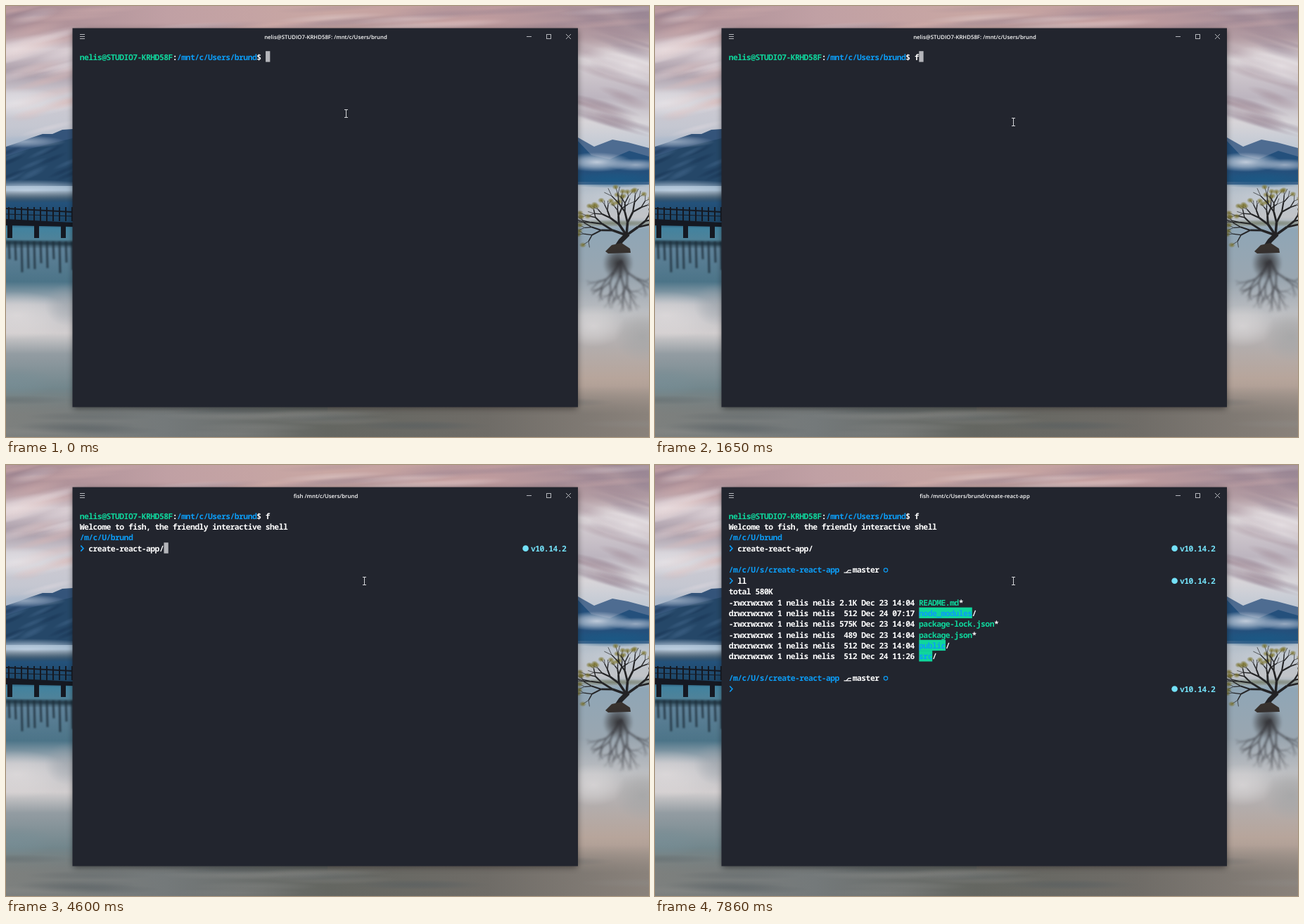
An HTML page with a canvas that plays this animation: 914 by 613 pixels, repeating every 8000 ms.

```html
<!DOCTYPE html>
<html lang="en">
<head>
<meta charset="utf-8">
<title>Terminal session</title>
<style>
  html, body { margin: 0; width: 100%; height: 100%; overflow: hidden; background: #8a8588; }
  canvas { display: block; }
</style>
</head>
<body>
<canvas id="stage" width="914" height="613"></canvas>
<script>
const W = 914, H = 613, LOOP = 8000;
const LEFT = 105, TOP = 64.2, CELL = 6.287, ROW = 15.375;
const WHITE = '#ffffff', GREEN = '#0fd69c', BLUE = '#0c9cf5', CYAN = '#74e1f8',
      RED = '#ff5c57', DIM = '#6d717d', PANEL = '#22252e';
const MONO = '11.4px "Noto Sans Mono", "DejaVu Sans Mono", monospace';
const USER = 'nelis', HOST = 'STUDIO7-KRHD58F', HOME = '/mnt/c/Users/brund';
const APP = 'create-react-app';

const ctx = document.getElementById('stage').getContext('2d');
const scene = document.createElement('canvas');
scene.width = W;
scene.height = H;
paintScene(scene.getContext('2d'));

// ---------- static desktop and window ----------

function paintScene(g) {
  let seed = 11;
  const rnd = () => (seed = seed * 16807 % 2147483647) / 2147483647;

  function column(x, w, stops) {
    const fill = g.createLinearGradient(0, 0, 0, H);
    for (const [y, color] of stops) fill.addColorStop(y / H, color);
    g.fillStyle = fill;
    g.fillRect(x, 0, w, H);
  }
  // Solid at the outer edge of the stage, fading out towards the other end.
  function fadeStrip(edge, solid, end, colors) {
    const fill = g.createLinearGradient(0, 0, W, 0);
    colors.forEach((c, i) => fill.addColorStop(i / (colors.length - 1), c));
    g.fillStyle = fill;
    for (let y = Math.min(edge, end); y < Math.max(edge, end); y++) {
      g.globalAlpha = Math.max(0, Math.min(1, (end - y) / (end - solid)));
      g.fillRect(0, y, W, 1);
    }
    g.globalAlpha = 1;
  }
  function glow(x, y, rx, ry, rgb, alpha, tilt = 0) {
    g.save();
    g.translate(x, y);
    g.rotate(tilt);
    g.scale(rx, ry);
    const fill = g.createRadialGradient(0, 0, 0, 0, 0, 1);
    fill.addColorStop(0, `rgba(${rgb},${alpha})`);
    fill.addColorStop(0.5, `rgba(${rgb},${alpha * 0.6})`);
    fill.addColorStop(1, `rgba(${rgb},0)`);
    g.fillStyle = fill;
    g.fillRect(-1, -1, 2, 2);
    g.restore();
  }
  function shape(color, ...points) {
    g.fillStyle = color;
    g.beginPath();
    for (const [x, y] of points) g.lineTo(x, y);
    g.fill();
  }
  function stroke(color, width, ...points) {
    g.strokeStyle = color;
    g.lineWidth = width;
    g.beginPath();
    for (const [x, y] of points) g.lineTo(x, y);
    g.stroke();
  }

  column(0, 457, [[0, '#a78d96'], [32, '#bda5ac'], [62, '#d3c7cd'], [95, '#a99ca8'],
    [125, '#cfcbd2'], [172, '#c5c7d1'], [250, '#8ea6bd'], [315, '#4f8097'], [345, '#5f8299'],
    [392, '#4c7488'], [425, '#b9bcc2'], [465, '#d2cecf'], [495, '#939ca2'],
    [545, '#71868c'], [H, '#7d7d79']]);
  column(457, 457, [[0, '#a18c97'], [45, '#b8a3a9'], [75, '#d8d1d5'], [130, '#bdb5bf'],
    [165, '#d8d5d9'], [215, '#b8c4d2'], [255, '#b3bfcb'], [300, '#c2c4c8'], [318, '#8fa6b6'],
    [390, '#9aa6b0'], [440, '#bfc0c3'], [485, '#b3adac'], [530, '#b7a59b'], [H, '#8a827c']]);
  fadeStrip(0, 24, 60, ['#a78b94', '#c0a0a4', '#c9a7a3', '#bd9a9d', '#a38f9a']);
  fadeStrip(H, 580, 540, ['#7d807e', '#74797a', '#646661', '#6f6c67', '#8a827b']);

  // streaky clouds above, calm ripples below
  const tones = ['232,222,226', '140,122,140', '222,184,180', '160,136,148'];
  for (let i = 0; i < 60; i++) {
    const side = i % 2 ? 813 : 0;
    glow(side + rnd() * 100, rnd() * 175, 30 + rnd() * 40, 4 + rnd() * 8,
      tones[i % 4], 0.35, side ? 0.3 : -0.25);
  }
  for (let i = 0; i < 24; i++) {
    glow(rnd() * W, 3 + rnd() * 28, 80, 6, tones[i % 4], 0.3, -0.06);
    glow(rnd() * W, 560 + rnd() * 50, 90, 7, i % 2 ? '142,142,140' : '84,92,96', 0.3);
  }
  glow(15, 62, 70, 18, '236,226,228', 0.7, -0.2);
  glow(15, 138, 75, 22, '230,228,232', 0.8);
  glow(890, 85, 70, 26, '238,234,236', 0.8, 0.2);
  glow(15, 440, 80, 34, '228,223,223', 0.7);
  glow(85, 425, 30, 30, '150,158,166', 0.5);
  glow(835, 455, 45, 30, '222,219,220', 0.7);
  glow(905, 470, 40, 36, '164,165,166', 0.8);
  glow(10, 535, 60, 22, '120,142,150', 0.7);

  // left mountains with mist
  shape('#34547a', [0, 200], [18, 194], [34, 188], [52, 182], [66, 182], [80, 176], [95, 175],
    [95, 256], [0, 256]);
  shape('#254768', [0, 214], [30, 204], [62, 196], [95, 188], [95, 256], [0, 256]);
  for (let i = 0; i < 14; i++) {
    glow(rnd() * 95, 205 + rnd() * 46, 24, 4, i % 2 ? '24,52,84' : '62,98,134', 0.6, -0.4);
  }
  glow(25, 193, 60, 9, '168,184,204', 0.8);
  glow(30, 263, 120, 16, '190,208,226', 1);
  column(0, 95, [[0, '#0000'], [262, '#0000'], [280, '#24527b'], [307, '#1c4566'],
    [316, '#42839f'], [332, '#4f8299'], [345, '#0000']]);

  // pier and its reflection
  const wood = '#151922';
  stroke(wood, 2, [0, 288], [95, 293]);
  stroke(wood, 1.2, [0, 296], [95, 299]);
  shape(wood, [0, 303], [95, 308], [95, 314], [0, 312]);
  for (let x = 4; x < 95; x += 9) stroke(wood, 2, [x, 286], [x, 306]);
  for (let x = 2; x < 95; x += 38) {
    g.fillStyle = wood;
    g.fillRect(x, 310, 7, 20);
  }
  g.filter = 'blur(1px)';
  stroke('rgba(30,52,66,.7)', 5, [0, 336], [95, 338]);
  for (let x = 4; x < 95; x += 9) {
    stroke('rgba(30,46,58,.75)', 3, [x, 335], [x + 1, 360 + rnd() * 20]);
  }
  g.filter = 'none';

  // right mountains
  shape('#4e6c91', [813, 187], [836, 200], [862, 190], [884, 194], [914, 202], [914, 254], [813, 254]);
  shape('#24507c', [813, 192], [832, 212], [858, 218], [886, 206], [914, 214], [914, 250], [813, 250]);
  glow(840, 222, 50, 14, '208,216,228', 0.9);
  glow(895, 226, 40, 9, '180,192,210', 0.8);
  glow(862, 247, 80, 12, '28,88,132', 1);
  glow(885, 274, 80, 18, '200,206,214', 0.8);
  glow(862, 309, 90, 5, '126,134,118', 1);

  // one branch rule for the tree and, flattened, for its reflection
  function branch(x, y, angle, length, depth, color, flip) {
    const x2 = x + Math.cos(angle) * length;
    const y2 = y - Math.sin(angle) * length * flip;
    stroke(color, depth * 0.7, [x, y], [x2, y2]);
    if (depth === 1) {
      if (flip > 0 && rnd() < 0.6) glow(x2, y2, 5, 4, '124,116,46', 0.9);
      return;
    }
    for (const turn of [-0.4, 0.35]) {
      branch(x2, y2, angle + turn + (rnd() - 0.5) * 0.6, length * (0.65 + rnd() * 0.3),
        depth - 1, color, flip);
    }
  }
  const bark = '#232325';
  stroke(bark, 7, [866, 346], [874, 334], [884, 324]);
  for (const angle of [2.75, 2.1, 1.5, 0.7]) branch(882, 326, angle, 21, 5, bark, 0.85);
  shape('#39332f', [852, 349], [861, 340], [875, 337], [887, 345], [888, 351], [856, 352]);
  g.filter = 'blur(1.5px)';
  glow(870, 366, 22, 24, '44,42,44', 0.9);
  for (const angle of [2.2, 1.6, 1]) branch(874, 362, angle, 17, 5, 'rgba(52,52,56,.6)', -1.2);
  g.filter = 'none';

  // window
  g.save();
  g.shadowColor = 'rgba(0,0,0,.5)';
  g.shadowBlur = 9;
  g.shadowOffsetY = 2;
  g.fillStyle = PANEL;
  g.fillRect(94.5, 31.5, 718.5, 539);
  g.restore();
  const icon = '#b6b8bd';
  for (const y of [40.5, 43.5, 46.5]) stroke(icon, 1, [105, y], [112, y]);
  stroke(icon, 1, [740, 43.5], [747, 43.5]);
  g.strokeRect(768.5, 40.5, 6, 6);
  stroke(icon, 1, [796, 40], [803, 47]);
  stroke(icon, 1, [803, 40], [796, 47]);
}

// ---------- terminal ----------

const colX = col => LEFT + col * CELL;
const rowY = row => TOP + row * ROW;

function cells(row, col, cols, color) {
  ctx.fillStyle = color;
  ctx.fillRect(colX(col), rowY(row), cols * CELL, ROW);
}

// Writes on the character grid and returns the next free column.
function write(row, col, text, color = WHITE, weight = 600) {
  ctx.font = `${weight} ${MONO}`;
  ctx.fillStyle = color;
  ctx.textAlign = 'center';
  for (const char of text) ctx.fillText(char, colX(col++ + 0.5), rowY(row) + 12.4);
  return col;
}

function line(color, width, ...points) {
  ctx.strokeStyle = color;
  ctx.lineWidth = width;
  ctx.beginPath();
  for (const [x, y] of points) ctx.lineTo(x, y);
  ctx.stroke();
}

function dot(x, y, r) {
  ctx.beginPath();
  ctx.arc(x, y, r, 0, 7);
}

function prompt(row) {
  const y = rowY(row) + 8.3;
  line(BLUE, 1.6, [106.3, y - 4], [110, y], [106.3, y + 4]);
  dot(738.6, y, 4.3);
  ctx.fillStyle = CYAN;
  ctx.fill();
  write(row, 102, 'v10.14.2', CYAN);
}

function repoPath(row) {
  write(row, 0, '/m/c/U/s/' + APP, BLUE);
  const y = rowY(row) + 12;
  line(WHITE, 1.2, [268.5, y], [279, y]);
  line(WHITE, 1.2, [272, y], [275, y - 3.5], [279, y - 3.5]);
  write(row, 28, 'master', WHITE, 700);
  dot(328, y - 3.5, 2.7);
  ctx.strokeStyle = BLUE;
  ctx.stroke();
}

const files = [
  ['-', '2.1K', '23 14:04', 'README.md'],
  ['d', ' 512', '24 07:17', 'node_modules'],
  ['-', '575K', '23 14:04', 'package-lock.json'],
  ['-', ' 489', '23 14:04', 'package.json'],
  ['d', ' 512', '23 14:04', 'public'],
  ['d', ' 512', '24 11:26', 'src'],
];

function listing(row) {
  write(row, 0, 'total 580K');
  for (const [kind, size, date, name] of files) {
    const isDir = kind === 'd';
    const col = write(++row, 0, `${kind}rwxrwxrwx 1 ${USER} ${USER} ${size} Dec ${date} `);
    if (isDir) cells(row, col, name.length, GREEN);
    const end = write(row, col, name, isDir ? BLUE : GREEN);
    write(row, end, isDir ? '/' : '*');
  }
}

// [start, row, col]; no row means the cursor is hidden
const cursorSteps = [
  [0, 0, 42], [600], [1190, 0, 42], [1650, 0, 43], [2060, 1, 0], [2210, 2, 0],
  [2360, 3, 2], [2950], [3510, 3, 2], [3920, 3, 3], [4050, 3, 4], [4200, 3, 5],
  [4600, 3, 19], [4880, 4, 0], [5000, 6, 2], [5560], [6110, 6, 2], [6760, 6, 3],
  [7040, 6, 4], [7190, 14, 0], [7310, 16, 2], [7860],
];
// [start, left, top]
const pointerSteps = [[0, 481, 147], [140, 474, 132], [300, 493, 144], [450, 507, 159]];
const titleSteps = [
  [0, `${USER}@${HOST}: ${HOME}`], [2210, `fish ${HOME}`], [5000, `fish ${HOME}/${APP}`],
  [7190, `ll ${HOME}/${APP}`], [7310, `fish ${HOME}/${APP}`],
];
const stepAt = (steps, t) => steps.findLast(step => step[0] <= t);

function firstCommand(t) {
  const full = APP + '/';
  if (t >= 4600) return write(3, 2, full, WHITE, 700);
  const typed = t < 4050 ? 1 : t < 4200 ? 2 : 3;
  write(3, 2, full.slice(0, typed), RED);
  write(3, 2 + typed, full.slice(typed), DIM);
}

function draw(t) {
  ctx.drawImage(scene, 0, 0);
  ctx.textRendering = 'geometricPrecision';

  ctx.font = '600 7.8px "Open Sans", "Noto Sans", sans-serif';
  ctx.fillStyle = WHITE;
  ctx.textAlign = 'center';
  ctx.fillText(stepAt(titleSteps, t)[1], 454.5, 47.3);

  if (t >= 300 && t < 1650) {
    cells(4, 59, 51, '#336b68');
    cells(5, 0, 60, '#336b68');
  }

  let col = write(0, 0, `${USER}@${HOST}`, GREEN);
  col = write(0, col, ':');
  col = write(0, col, HOME, BLUE);
  write(0, col, '$');
  if (t >= 1650) write(0, 42, 'f');
  if (t >= 2210) write(1, 0, 'Welcome to fish, the friendly interactive shell');
  if (t >= 2360) {
    write(2, 0, '/m/c/U/brund', BLUE);
    prompt(3);
  }
  if (t >= 3920) firstCommand(t);
  if (t >= 5000) {
    repoPath(5);
    prompt(6);
  }
  if (t >= 7040) write(6, 2, 'll', WHITE, 700);
  else if (t >= 6760) write(6, 2, 'l', RED);
  if (t >= 7190) listing(7);
  if (t >= 7310) {
    repoPath(15);
    prompt(16);
  }

  const [, row, cursorCol] = stepAt(cursorSteps, t);
  if (row !== undefined) cells(row, cursorCol, 1, '#b4b5ba');

  const [, x, y] = stepAt(pointerSteps, t);
  line('#d5d6d9', 1, [x, y + 0.5], [x + 5, y + 0.5]);
  line('#d5d6d9', 1, [x + 2.5, y], [x + 2.5, y + 12]);
  line('#d5d6d9', 1, [x, y + 11.5], [x + 5, y + 11.5]);
}

const start = performance.now();
function tick() {
  draw((performance.now() - start) % LOOP);
  requestAnimationFrame(tick);
}
tick();
</script>
</body>
</html>
```
